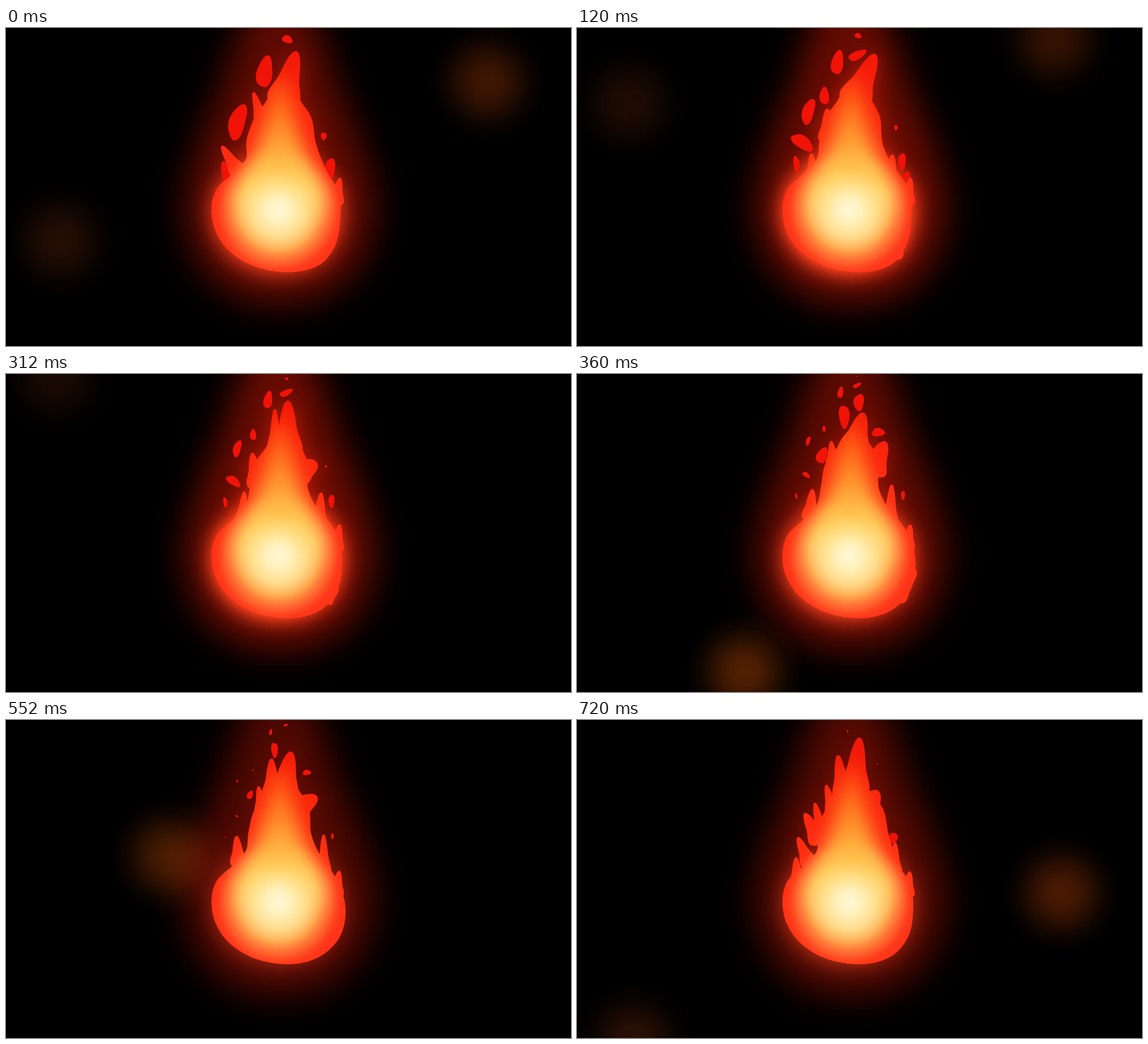
An HTML page with a canvas for the animation above (0.84 s loop, 998 by 561 pixels).

```html
<!DOCTYPE html>
<html lang="en">
<head>
<meta charset="utf-8">
<title>Flame</title>
<style>
html, body { margin: 0; width: 100%; height: 100%; overflow: hidden; background: #000; }
canvas { display: block; }
</style>
</head>
<body>
<canvas id="stage" width="998" height="561"></canvas>
<script>
const W = 998, H = 561, HOLD = 120, STEPS = 7;
const TAU = 2 * Math.PI;
const flicker = [0.75, 1, 1, 0.8, 0.4, 0.85, 0.5];

const mix = (a, b, t) => a + (b - a) * t;
const wave = (step, peak) => Math.cos(TAU * (step - peak) / STEPS);
const ageAt = (step, first) => (step - first + STEPS) % STEPS;

const licks = [], embers = [], orbs = [];
const lick = (first, life, x, y, tipX, tipY, endX, endY, width) =>
  licks.push({ first, life, x, y, tipX, tipY, endX, endY, width });
const ember = (first, life, x, y, endX, endY, rx, ry, deg = 0) =>
  embers.push({ first, life, x, y, endX, endY, rx, ry, turn: deg * TAU / 360 });
const orb = (first, x, drift, color, ...heights) =>
  orbs.push({ first, life: heights.length, x, drift, color, heights });

// Tongues rooted in the body: first step, life, root, tip at birth and at the end, width.
lick(3, 4, 489, 132, 506, 68, 499, 31, 36);
lick(0, 2, 488, 132, 513, 41, 527, 46, 40);
lick(2, 1, 497, 142, 498, 47, 498, 47, 36);
lick(4, 3, 470, 138, 469, 68, 461, 62, 24);
lick(2, 1, 475, 140, 475, 62, 475, 62, 18);
lick(2, 2, 520, 172, 550, 157, 545, 119, 36);
lick(4, 3, 514, 156, 550, 135, 531, 124, 34);
lick(0, 4, 553, 275, 558, 237, 556, 195, 20);
lick(4, 3, 562, 275, 561, 202, 562, 216, 17);
lick(0, 7, 583, 310, 590, 264, 588, 267, 18);
lick(1, 3, 562, 394, 574, 406, 599, 346, 26);
lick(3, 5, 452, 165, 449, 118, 437, 113, 17);
lick(1, 2, 442, 198, 442, 142, 435, 139, 22);
lick(5, 2, 434, 208, 424, 153, 420, 146, 18);
lick(6, 1, 428, 214, 402, 164, 402, 164, 24);
lick(3, 5, 411, 255, 416, 203, 381, 208, 20);
lick(1, 2, 416, 265, 414, 221, 421, 207, 17);
lick(5, 2, 389, 295, 388, 255, 387, 242, 19);

// Loose pieces: first step, life, start, end, radii, tilt.
ember(0, 6, 457, 78, 470, 8, 14, 28, 14);
ember(0, 4, 497, 20, 495, 2, 9, 7, 30);
ember(1, 5, 495, 48, 494, -4, 18, 7, -25);
ember(3, 4, 472, 75, 479, 12, 9, 21);
ember(3, 1, 498, 50, 498, 50, 9, 15);
ember(0, 5, 409, 166, 408, 102, 15, 31, 18);
ember(1, 4, 437, 120, 436, 84, 8, 16);
ember(1, 4, 398, 202, 409, 165, 22, 11, 38);
ember(0, 5, 388, 255, 387, 202, 8, 19, -5);
ember(6, 5, 559, 208, 567, 148, 7, 10);
ember(0, 7, 573, 248, 578, 188, 9, 18);
ember(1, 1, 583, 262, 583, 262, 6, 9);
ember(3, 3, 433, 144, 429, 118, 9, 15, 18);
ember(3, 4, 532, 103, 530, 74, 12, 7, -5);

// Soft lights that rise past: first step, x, drift per step, colour, height at each step.
orb(5, 862, -6, [86, 30, 4], 565, 305, 95, 20);
orb(6, 100, -4, [42, 16, 4], 565, 375, 132, 5);
orb(3, 296, -8, [84, 32, 3], 525, 240, -10);

// Closed curve through the points; handle lengths follow the segment lengths.
function smooth(points) {
  const n = points.length, path = new Path2D();
  const at = i => points[(i + n) % n];
  const tangent = i => {
    const [ax, ay] = at(i - 1), [bx, by] = at(i + 1);
    const d = Math.hypot(bx - ax, by - ay) || 1;
    return [(bx - ax) / d, (by - ay) / d];
  };
  path.moveTo(...at(0));
  for (let i = 0; i < n; i++) {
    const [x, y] = at(i), [u, v] = at(i + 1);
    const [tx, ty] = tangent(i), [sx, sy] = tangent(i + 1);
    const h = Math.hypot(u - x, v - y) * 0.32;
    path.bezierCurveTo(x + tx * h, y + ty * h, u - sx * h, v - sy * h, u, v);
  }
  path.closePath();
  return path;
}

function ellipse(x, y, rx, ry) {
  const path = new Path2D();
  path.ellipse(x, y, rx, ry, 0, 0, TAU);
  return path;
}

function lickPath({ life, x, y, tipX, tipY, endX, endY, width }, age) {
  const t = life > 1 ? age / (life - 1) : 0;
  const dx = mix(tipX, endX, t) - x, dy = mix(tipY, endY, t) - y;
  const d = Math.hypot(dx, dy);
  const at = (along, side) => [
    x + dx * along + dy / d * side * width,
    y + dy * along - dx / d * side * width];
  return smooth([at(0, 0.65), at(0.5, 0.45), at(0.87, 0.25), at(1, 0),
    at(0.87, -0.25), at(0.5, -0.45), at(0, -0.65)]);
}

// A lumpy oval that shrinks as it slows down.
function emberPath({ life, x, y, endX, endY, rx, ry, turn }, age, seed) {
  const left = (1 - age / life) ** 1.5;
  const cx = mix(endX, x, left), cy = mix(endY, y, left);
  const cos = Math.cos(turn), sin = Math.sin(turn);
  const points = Array.from({ length: 14 }, (_, i) => {
    const a = i / 14 * TAU;
    const r = left * (1 + 0.09 * Math.sin(3 * a + seed) + 0.06 * Math.sin(2 * a + seed * 2.3));
    const px = rx * r * Math.cos(a), py = ry * r * Math.sin(a);
    return [cx + px * cos - py * sin, cy + px * sin + py * cos];
  });
  return smooth(points);
}

// Trunk and bulb, swaying once per loop.
function corePath(step) {
  const waist = wave(step, 6), bulge = wave(step, 4);
  return smooth([[488, 104], [507, 112], [524, 134], [537 + 5 * waist, 160], [541 + 9 * waist, 200],
    [553 + 7 * waist, 232], [572, 262], [589, 290], [595 + 5 * bulge, 335], [586 + 4 * bulge, 382],
    [555, 417], [503, 431], [440, 421], [395, 394], [370, 358], [363, 318], [372, 284],
    [401, 256], [424, 230], [427 - 4 * waist, 200], [438, 160], [459, 130], [470, 112]]);
}

function collect(parts, step, toPath, path = new Path2D()) {
  parts.forEach((part, i) => {
    const age = ageAt(step, part.first);
    if (age < part.life) path.addPath(toPath(part, age, i));
  });
  return path;
}

const mirrored = (cx, top, bottom, ...rows) => smooth([[cx, top],
  ...rows.map(([half, y]) => [cx + half, y]), [cx, bottom],
  ...rows.reverse().map(([half, y]) => [cx - half, y])]);
const aura = mirrored(484, -70, 486, [66, 0], [100, 100], [144, 210], [168, 320], [138, 420], [72, 474]);
const column = mirrored(484, 84, 385, [13, 112], [24, 150], [36, 200], [56, 250], [80, 300], [70, 350]);

function paint(ctx, path, style, blur = 0) {
  ctx.filter = blur ? `blur(${blur}px)` : 'none';
  ctx.fillStyle = style;
  ctx.fill(path);
  ctx.filter = 'none';
}

function ramp(gradient, ...stops) {
  for (const [at, color] of stops) gradient.addColorStop(at, color);
  return gradient;
}

function radial(ctx, x, y, r, ...stops) {
  ctx.fillStyle = ramp(ctx.createRadialGradient(x, y, 0, x, y, r), ...stops);
  ctx.fillRect(x - r, y - r, 2 * r, 2 * r);
}

function drawOrb(ctx, { x, drift, color, heights }, age) {
  const shade = a => `rgba(${color},${a * (1 - 0.13 * age)})`;
  radial(ctx, x + drift * age, heights[age], 104,
    [0, shade(1)], [0.25, shade(0.88)], [0.5, shade(0.55)], [0.75, shade(0.18)], [1, shade(0)]);
}

function render(step) {
  const layer = document.createElement('canvas');
  layer.width = W;
  layer.height = H;
  const ctx = layer.getContext('2d');
  const glow = flicker[step];
  const body = collect(licks, step, lickPath, corePath(step));
  const sparks = collect(embers, step, emberPath);

  ctx.fillStyle = '#000';
  ctx.fillRect(0, 0, W, H);
  ctx.globalCompositeOperation = 'lighter';
  for (const o of orbs) {
    const age = ageAt(step, o.first);
    if (age < o.life) drawOrb(ctx, o, age);
  }
  paint(ctx, aura, `rgb(${62 + 42 * glow},${6 + 5 * glow},2)`, 30);
  paint(ctx, ellipse(479, 327, 116, 107), `rgba(190,85,45,${glow * 0.75})`, 18);
  paint(ctx, body, `rgba(140,24,10,${glow * 0.6})`, 18);
  ctx.globalCompositeOperation = 'source-over';

  paint(ctx, sparks, '#f01308');
  paint(ctx, body, ramp(ctx.createLinearGradient(0, 30, 0, 430),
    [0, '#f01708'], [0.25, '#fa240c'], [0.6, '#ff3014'], [1, '#ff351a']));

  ctx.save();
  ctx.clip(body);
  radial(ctx, 481, 322, 116, [0, '#ffe9a8'], [0.4, '#ffd27c'], [0.62, 'rgba(255,172,80,.92)'],
    [0.82, 'rgba(255,112,52,.65)'], [1, 'rgba(255,56,24,0)']);
  paint(ctx, column, ramp(ctx.createLinearGradient(0, 70, 0, 350),
    [0, '#ff4a10'], [0.22, '#ff6c1a'], [0.46, '#ff9c32'], [0.64, '#ffc650'],
    [0.8, 'rgba(255,220,110,.8)'], [1, 'rgba(255,224,130,0)']), 16);
  radial(ctx, 481, 321, 75, [0, 'rgba(255,247,214,1)'], [0.28, 'rgba(255,243,196,.9)'],
    [1, 'rgba(255,222,130,0)']);
  ctx.restore();
  return layer;
}

const layers = Array.from({ length: STEPS }, (_, step) => render(step));
const screen = document.getElementById('stage').getContext('2d');

function tick(now) {
  screen.drawImage(layers[Math.floor(now / HOLD) % STEPS], 0, 0);
  requestAnimationFrame(tick);
}
tick(0);
</script>
</body>
</html>
```
